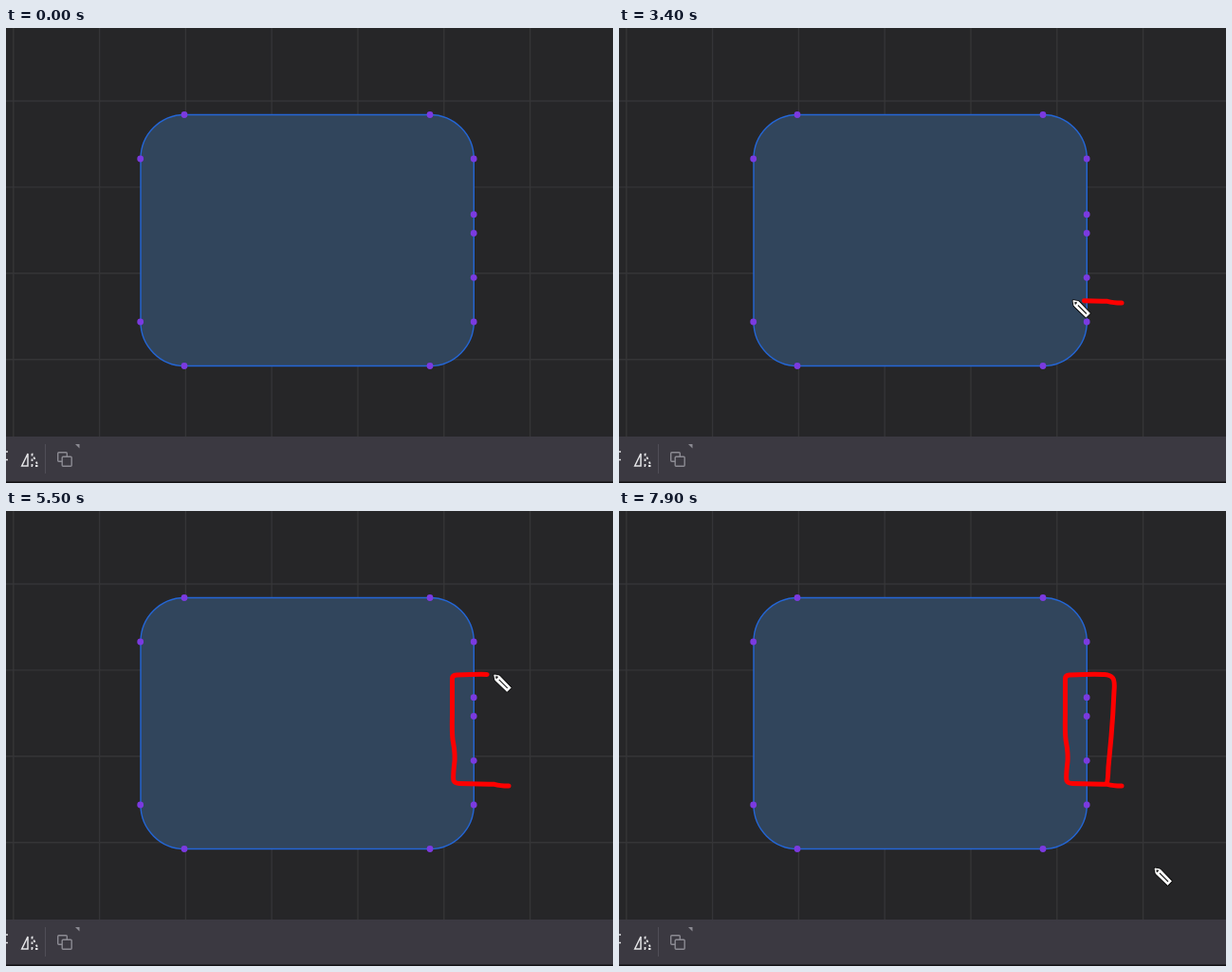
An HTML page for the animation above (8000 ms loop, 640x480 px).

```html
<!DOCTYPE html>
<html>
<head>
<meta charset="utf-8">
<style>
  html, body { margin: 0; width: 100%; height: 100%; overflow: hidden; background: #262628; }
  svg { display: block; }
</style>
</head>
<body>
<svg width="640" height="480" viewBox="0 0 640 480" fill="none">
  <rect width="640" height="480" fill="#262628"/>
  <path id="grid" stroke="#353537" stroke-width="1.4"/>
  <rect x="142" y="91.5" width="351.3" height="265" rx="46.5" fill="#31455c" stroke="#2466d6" stroke-width="1.4"/>
  <g id="nodes" fill="#7b3ae0"></g>

  <g id="toolbar">
    <rect y="431" width="640" height="48" fill="#3b3941"/>
    <rect y="478.5" width="640" height="1.5" fill="#111013"/>
    <path d="M0 447h2M0 455.5h2" stroke="#e4e4e6" stroke-width="1.3"/>
    <g stroke="#e4e4e6" stroke-width="1.5">
      <path d="M16.7 462H23V449Z"/>
      <path d="M27.5 449V462H34Z" stroke-dasharray="2.5 3" stroke-width="1.8"/>
    </g>
    <path d="M41.5 439V470" stroke="#504e57"/>
    <g stroke="#8c8b93" stroke-width="1.4">
      <rect x="54.7" y="447.7" width="9.6" height="9.6" rx="1"/>
      <rect x="59.2" y="452.2" width="10" height="10" rx="1" fill="#3b3941"/>
    </g>
    <path d="M73 439H77.5V443.5Z" fill="#8c8b93"/>
  </g>

  <path id="ink" stroke="#f00" stroke-width="5" stroke-linecap="round" stroke-linejoin="round"/>
  <g id="pencil" stroke-linejoin="round">
    <path d="M0 0L5.5 1L17.5 13.5L13.5 17.5L1 5.5Z" fill="#fff" stroke="#111" stroke-width="2.6"/>
    <path d="M0 0L5.5 1L17.5 13.5L13.5 17.5L1 5.5Z" fill="#fff" stroke="#fff" stroke-width=".8"/>
    <path d="M2 2L3.5 2.3L2.3 3.5ZM5 5L14 14" fill="#222" stroke="#222" stroke-width="1.2"/>
  </g>
</svg>
<script>
const el = id => document.getElementById(id);
const LOOP = 8000, STEP = 100;
// Moments in steps
const ENTER = 7, ARRIVE = 18, TOUCH = 22, PRESS = 28, LEAVE = 73, GONE = 79;

// The four sides of the hand-drawn box; the hand slows down at each corner
const legs = [
  { start: 29, end: 35.5, d: 'M530 290Q521 290 515 288.3L478 287.5Q473.5 287.5 472 284.5' },
  { start: 35.5, end: 49, d: 'Q471 281 473 264Q473.5 254 471.5 244Q470 238 470.5 215L470.5 177' },
  { start: 49, end: 56.7, d: 'Q470.5 173.3 475 173Q497 172 512 172.5Q518 173 520.5 176' },
  { start: 56.7, end: 71.5, d: 'Q523 179 522 190Q521 215 519 238L516 270Q515.5 286 514 288' }
];

const ink = el('ink');
let route = '', total = 0;
for (const leg of legs) {
  route += leg.d;
  ink.setAttribute('d', route);
  leg.length = ink.getTotalLength() - total;
  total += leg.length;
}

const progress = (s, a, b) => Math.min(1, Math.max(0, (s - a) / (b - a)));
const smooth = p => p * p * (3 - 2 * p);
const easeOut = p => 1 - (1 - p) ** 3;
const mix = (a, b, p) => ({ x: a.x + (b.x - a.x) * p, y: a.y + (b.y - a.y) * p });

const drawnLength = s => legs.reduce(
  (sum, leg) => sum + leg.length * smooth(progress(s, leg.start, leg.end)), 0);

function tipAt(s) {
  if (s < TOUCH) return mix({ x: 540, y: 461 }, { x: 530, y: 294 }, easeOut(progress(s, ENTER, ARRIVE)));
  const onInk = ink.getPointAtLength(drawnLength(s));
  return mix(onInk, { x: 565, y: 377 }, smooth(progress(s, LEAVE, GONE)));
}

let grid = '';
for (let i = 0; i < 7; i++) grid += `M${7.8 + 90.8 * i} 0V431`;
for (let i = 0; i < 4; i++) grid += `M0 ${77 + 90.9 * i}H640`;
el('grid').setAttribute('d', grid);

const nodes = [
  ...[188, 447].flatMap(x => [[x, 91.5], [x, 356.5]]),
  ...[138, 310].map(y => [141.7, y]),
  ...[138, 196.7, 216.5, 263.3, 310].map(y => [493.2, y])
];
el('nodes').innerHTML = nodes.map(([x, y]) => `<circle cx="${x}" cy="${y}" r="3.4"/>`).join('');

function draw(now) {
  const s = Math.floor(now % LOOP / STEP);
  const { x, y } = tipAt(s);
  el('pencil').setAttribute('transform', `translate(${x} ${y})`);
  el('pencil').style.display = s < ENTER ? 'none' : '';

  // The ink trails the pencil by one step
  ink.style.display = s < PRESS ? 'none' : '';
  ink.setAttribute('stroke-dasharray', `${Math.max(.01, drawnLength(s - 1))} 999`);
}

const start = performance.now();
function frame() {
  draw(performance.now() - start);
  requestAnimationFrame(frame);
}
frame();
</script>
</body>
</html>
```
